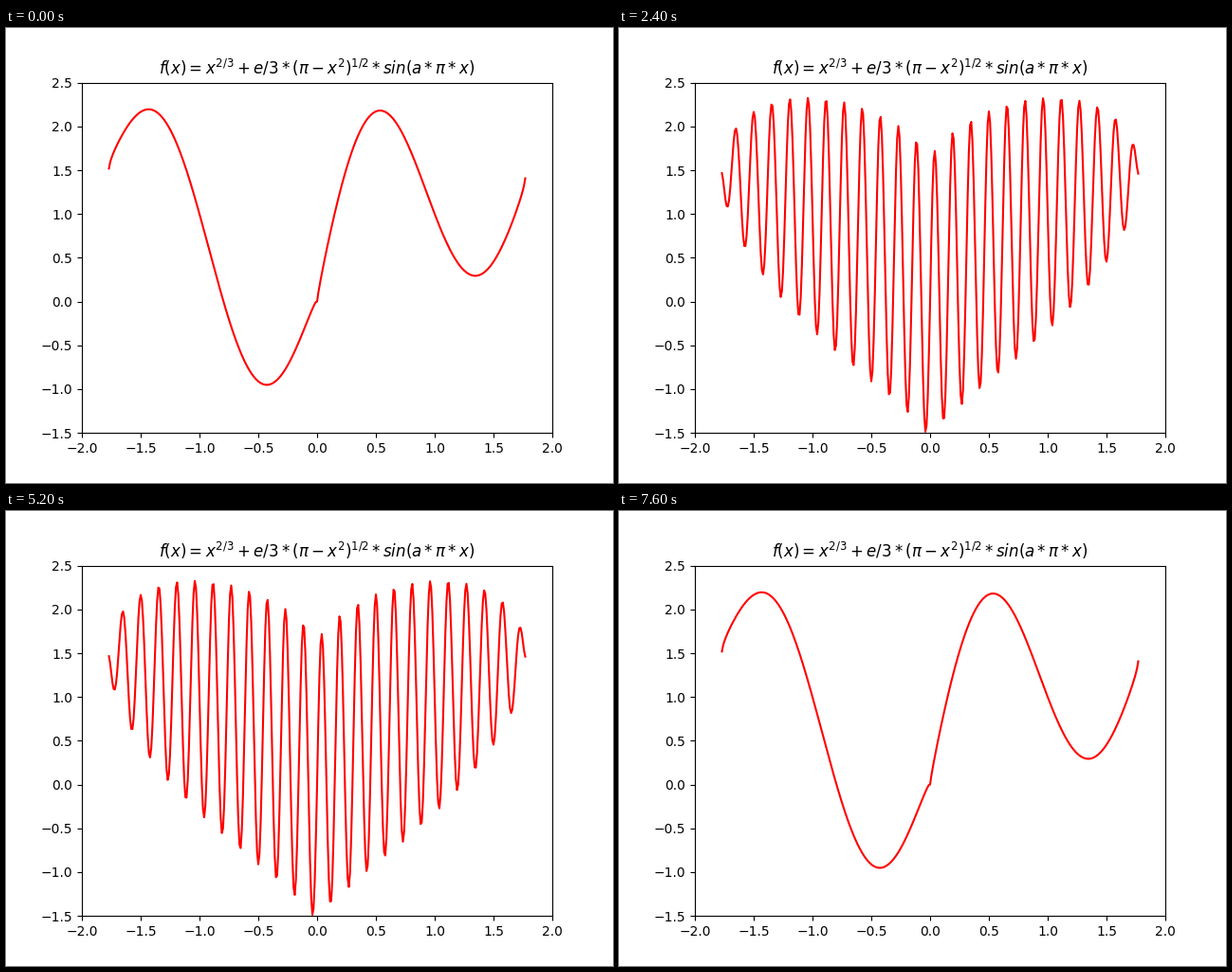
Animation of 640x480 px, one loop 7800 ms. Source, as a matplotlib script:

```python
import numpy as np
import matplotlib.pyplot as plt
from matplotlib.animation import FuncAnimation

PEAK = 20
FRAMES = 2 * PEAK - 1
INTERVAL = 200

x = np.arange(-177, 178) / 100
base = np.cbrt(x ** 2)
envelope = np.e / 3 * np.sqrt(np.pi - x ** 2)


def heart(a):
    return base + envelope * np.sin(a * np.pi * x)


fig, ax = plt.subplots(figsize=(6.4, 4.8), dpi=100)
ax.set_xlim(-2, 2)
ax.set_ylim(-1.5, 2.5)
ax.set_title(r"$f(x)=x^{2/3}+e/3*(\pi-x^2)^{1/2}*sin(a*\pi*x)$")
line, = ax.plot(x, heart(1), color="red", lw=1.5)


def update(i):
    # a climbs 1..PEAK one step per frame, then falls back to 1
    line.set_ydata(heart(PEAK - abs(i - (PEAK - 1))))
    return line,


anim = FuncAnimation(fig, update, frames=FRAMES, interval=INTERVAL,
                     repeat=True, repeat_delay=0, blit=False)
plt.show()
```
